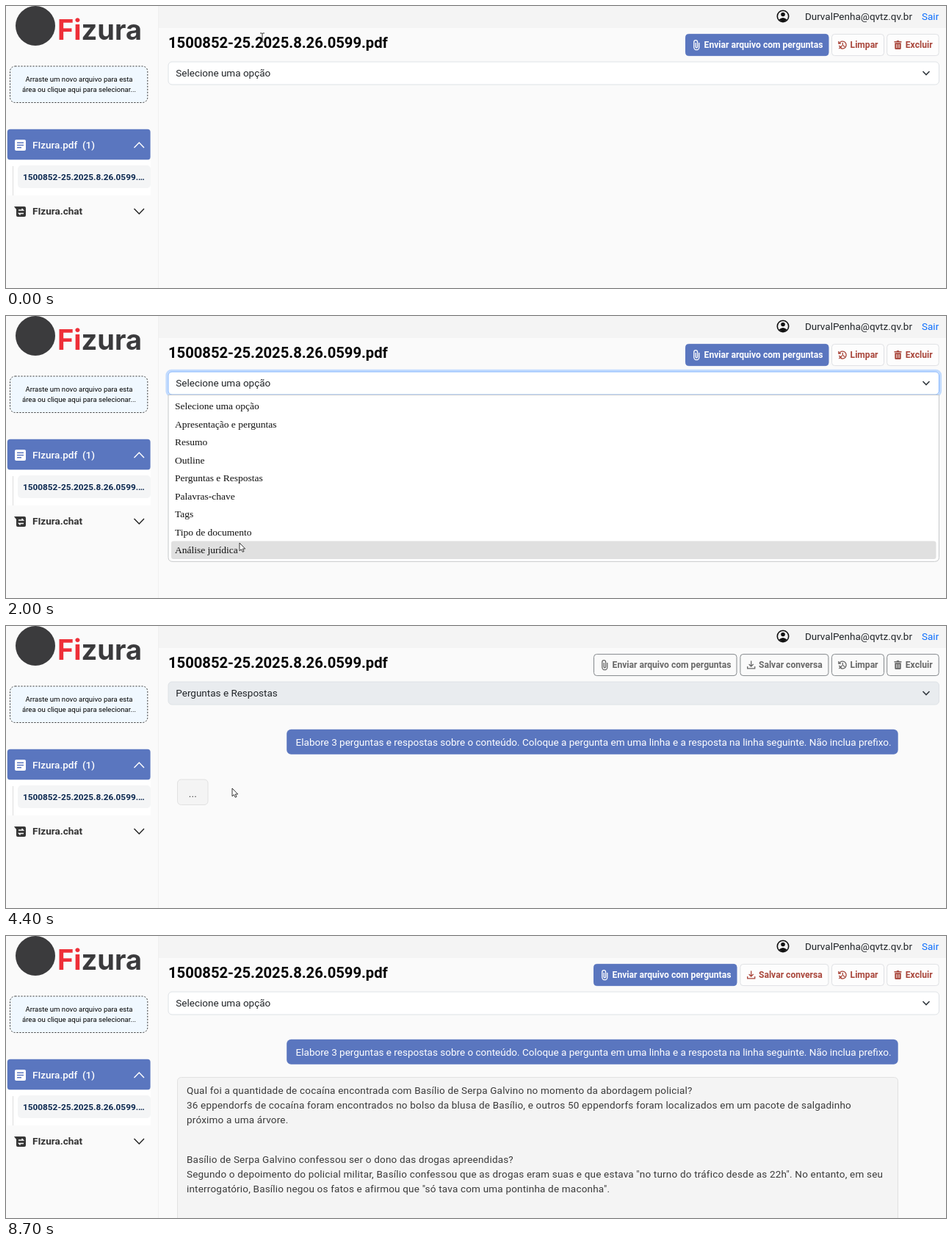
An HTML page for the animation above (8900 ms loop, 1280 by 384 pixels).

```html
<!DOCTYPE html>
<html lang="pt-BR">
<head>
<meta charset="utf-8">
<title>Perguntas e respostas</title>
<style>
  html, body { margin: 0; width: 100%; height: 100%; overflow: hidden; background: #fafafa; }
  svg { display: block; width: 100vw; height: 100vh; }
  text { font: 13.5px Roboto, sans-serif; fill: #212529; white-space: pre; }
  .bold { font-weight: 700; }
  .title { font-size: 20.2px; fill: #000; }
  .brand { font: 700 38px Inter, sans-serif; fill: #3b3b3d; }
  .drop { font-size: 9.6px; fill: #000; text-anchor: middle; }
  .option { font-family: "Liberation Serif", serif; fill: #111; }
  .answer { fill: #3a3a3a; letter-spacing: .19px; }
  .white { fill: #fff; }
  .medium { font-weight: 500; }
  .line { fill: none; stroke: currentColor; stroke-width: 1.3; }
  .label { font-size: 12.1px; font-weight: 700; fill: currentColor; }
  .primary { color: #fff; --fill: #5a76bf; --edge: #5a76bf; }
  .danger { color: #a9463b; --fill: #fdfdfd; --edge: #dfe1e4; }
  .busy { color: #686868; --fill: #fafafa; --edge: #85898d; }
  .box { fill: var(--fill); stroke: var(--edge); }
</style>
</head>
<body>
<svg viewBox="0 0 1280 384" preserveAspectRatio="none">
  <defs>
    <g id="clip"><path class="line" d="M3.5-3V3.2a3.5 3.5 0 0 1-7 0V-4a2.4 2.4 0 0 1 4.8 0V2.6a1.2 1.2 0 0 1-2.4 0V-3"/></g>
    <g id="save"><path class="line" d="M0-5.5V2M-3-1 0 2 3-1M-5 2V4.8H5V2"/></g>
    <g id="history"><path class="line" d="M-4.5-2.5A5 5 0 1 1-3 4.2M-5.5-5V-2H-2.5M0-3V.5L3 2.5M-5 1 -1 5M-1 1-5 5"/></g>
    <g id="trash">
      <path fill="currentColor" d="M-5-5H-2L-1.3-6H1.3L2-5H5V-3.6H-5ZM-4.2-2.8H4.2V4.5Q4.2 6 2.8 6H-2.8Q-4.2 6-4.2 4.5Z"/>
      <path d="M-1.5-1V4.2M1.5-1V4.2" stroke="var(--fill)" stroke-width="1"/>
    </g>
  </defs>

  <rect width="1280" height="384" fill="#fafafa"/>
  <rect x="207" width="1073" height="30" fill="#f4f4f4"/>
  <path d="M207.5 0V384" stroke="#f0f0f0"/>

  <circle cx="40" cy="27" r="27" fill="#3b3b3d"/>
  <text class="brand" x="70" y="46"><tspan fill="#ee2f38">Fi</tspan>zura</text>

  <rect x="5.5" y="82" width="187.3" height="49.5" rx="7" fill="#f0f8ff" stroke="#333" stroke-dasharray="2 2"/>
  <text class="drop" x="99.5" y="103.3">Arraste um novo arquivo para esta</text>
  <text class="drop" x="99.5" y="117.3">área ou clique aqui para selecionar...</text>

  <rect x="1.8" y="167.8" width="194.8" height="41.8" rx="4" fill="#5a76bf"/>
  <rect x="12" y="182" width="15" height="15" rx="2" fill="#fff"/>
  <path d="M15 186.2H24M15 189.5H24M15 192.8H21" stroke="#5a76bf" stroke-width="1.5"/>
  <text class="white medium" x="36" y="194">FIzura.pdf  (1)</text>
  <path d="M174.5 193 181.3 186 188 193" fill="none" stroke="#fff" stroke-width="1.4"/>
  <rect x="2" y="209.6" width="195" height="48.4" fill="#fff"/>
  <path d="M9.5 218V258" stroke="#dcdcdc"/>
  <rect x="16" y="217" width="181" height="31" rx="5" fill="#f4f5f6"/>
  <text class="bold" style="font-size:11.8px;fill:#0b2850" x="23" y="237">1500852-25.2025.8.26.0599.…</text>

  <path d="M11 273H25Q27 273 27 275V285Q27 287 25 287H16Q14 287 14 285V277Z" fill="#363636"/>
  <path d="M17 278H23.5L21.5 276M24 282.5H17.5L19.5 284.5" fill="none" stroke="#fff" stroke-width="1.3"/>
  <text class="bold" style="fill:#333" x="36" y="284.3">FIzura.chat</text>
  <path d="M174.5 276 181.3 283 188 276" fill="none" stroke="#222" stroke-width="1.4"/>

  <circle cx="1058" cy="14" r="7.7" fill="none" stroke="#111" stroke-width="1.6"/>
  <circle cx="1058" cy="11.5" r="2.8" fill="#111"/>
  <path d="M1052.5 18.5Q1058 13.5 1063.5 18.5 1058 24 1052.5 18.5Z" fill="#111"/>
  <text x="1234" y="19" text-anchor="end">DurvalPenha@qvtz.qv.br</text>
  <text x="1247" y="19" style="fill:#0d6efd">Sair</text>

  <text class="title bold" x="221" y="56.5">1500852-25.2025.8.26.0599.pdf</text>
  <g id="buttons"></g>

  <rect id="ring" x="219" y="74.3" width="1053.5" height="34.4" rx="6.5" fill="none" stroke="#c2dbfe" stroke-width="3.2"/>
  <rect id="select" x="221" y="76" width="1049.5" height="31" rx="5"/>
  <text id="choice" x="231.3" y="96.3"></text>
  <path d="M1248.5 89 1253 93.6 1257.5 89" fill="none" stroke="#343a40" stroke-width="1.6"/>

  <g id="menu">
    <path d="M221 107.5H1270.5V328.5Q1270.5 334.3 1264.5 334.3H227Q221 334.3 221 328.5Z" fill="#fff" stroke="#c6c8ca"/>
    <rect id="hover" x="225" width="1041.5" height="24.5" rx="3" fill="#e0e0e0"/>
  </g>

  <g id="chat">
    <rect x="382.2" y="140.8" width="832.5" height="34" rx="6" fill="#5a76bf"/>
    <text class="white" x="394.6" y="163.3">Elabore 3 perguntas e respostas sobre o conteúdo. Coloque a pergunta em uma linha e a resposta na linha seguinte. Não inclua prefixo.</text>
    <rect id="bubble" x="233.5" rx="5" fill="#f4f4f4" stroke="#e1e1e1"/>
    <text id="dots" class="answer" x="248.8" y="232.5">...</text>
    <g id="reply"></g>
  </g>

  <g id="cursor">
    <path id="arrow" d="M0 0V10.8L2.5 8.6 4.2 12.3 6 11.5 4.3 8H7.7Z" fill="#fff" stroke="#222" stroke-width=".9"/>
    <path id="beam" d="M-3-6H-1Q0-6 0-5V5Q0 6-1 6H-3M3-6H1Q0-6 0-5M0 5Q0 6 1 6H3" fill="none" stroke="#333"/>
  </g>
</svg>
<script>
const LOOP = 8900;
const $ = id => document.getElementById(id);
const show = (node, on) => { node.style.display = on ? '' : 'none'; };

function add(parent, tag, attrs, content = '') {
  const node = document.createElementNS('http://www.w3.org/2000/svg', tag);
  for (const key in attrs) node.setAttribute(key, attrs[key]);
  node.textContent = content;
  return parent.appendChild(node);
}

function button(parent, kind, x, width, icon, label) {
  const g = add(parent, 'g', { class: kind });
  add(g, 'rect', { class: 'box', x: x + .2, y: 38.4, width: width - .5, height: 29.2, rx: 4 });
  add(g, 'use', { href: '#' + icon, x: x + 15, y: 53 });
  add(g, 'text', { class: 'label', x: x + 25.3, y: 57.4 }, label);
}

function toolbar(main, side, withSave) {
  const g = add($('buttons'), 'g', {});
  button(g, main, withSave ? 800.3 : 925.3, 195, 'clip', 'Enviar arquivo com perguntas');
  if (withSave) button(g, side, 999.7, 120.5, 'save', 'Salvar conversa');
  button(g, side, 1124.3, 71.5, 'history', 'Limpar');
  button(g, side, 1199.5, 71, 'trash', 'Excluir');
  return g;
}

const idleBar = toolbar('primary', 'danger', false);
const busyBar = toolbar('busy', 'busy', true);
const doneBar = toolbar('primary', 'danger', true);

const options = ['Selecione uma opção', 'Apresentação e perguntas', 'Resumo', 'Outline',
  'Perguntas e Respostas', 'Palavras-chave', 'Tags', 'Tipo de documento', 'Análise jurídica'];
const ROW = 24.5, MENU_TOP = 110.7;
options.forEach((name, i) =>
  add($('menu'), 'text', { class: 'option', x: 230, y: MENU_TOP + 16.7 + i * ROW }, name));

// Each line of the reply: arrival time, baseline, text, then a late ending
const lines = [
  [7100, 214.6, 'Qual foi a quantidade de cocaína encontrada com Basílio de Serpa Galvino no momento da abordagem policial?'],
  [7500, 234.8, '36 eppendorfs de cocaína foram encontrados no bolso da blusa de Basílio, e outros 50 eppendorfs foram localizados em um pacote de salgadinho'],
  [7500, 255, 'próximo a uma árvore', 7800, '.'],
  [7800, 308.8, 'Basílio de Serpa Galvino confessou ser o dono das drogas apreendidas?'],
  [8200, 329, 'Segundo o depoimento do policial militar, Basílio confessou que as drogas eram suas e que estava "no turno do tráfico desde as 22h". No entanto, em seu'],
  [8200, 349.2, 'interrogatório, Basílio negou os fatos e afirmou que "só tava com uma pontinha de maconha', 8500, '".']
].map(([at, y, text, tailAt, tail = '']) =>
  ({ at, y, text, tailAt, tail, node: add($('reply'), 'text', { class: 'answer', x: 246, y }) }));

// Pointer path: time, x, y
const path = [
  [0, 349, 43], [100, 374, 72], [200, 394, 97], [1000, 394, 97], [1100, 388, 130],
  [1200, 364, 216], [1300, 348, 248], [1700, 321, 311], [1900, 321, 311], [2000, 318, 309],
  [2800, 301, 212], [2900, 300, 208], [3300, 300, 208], [3400, 300, 214], [3500, 300, 221],
  [4300, 300, 221], [4400, 308, 221], [4600, 370, 188], [4800, 470, 158], [4900, 470, 158],
  [5000, 450, 158], [5800, 767, 168], [6300, 1015, 168], [6800, 1015, 168],
  [7200, 600, 85], [7600, 97, 358]
];

function pointer(t) {
  const i = path.findIndex(p => p[0] > t);
  if (i < 0) return path[path.length - 1].slice(1);
  const [t0, x0, y0] = path[i - 1], [t1, x1, y1] = path[i];
  const k = (t - t0) / (t1 - t0);
  return [x0 + (x1 - x0) * k, y0 + (y1 - y0) * k];
}

function drawBubble(t) {
  const waiting = t < lines[0].at;
  let bottom = 243.5;
  for (const line of lines) {
    line.node.textContent = t < line.at ? '' : line.text + (t >= line.tailAt ? line.tail : '');
    if (t >= line.at) bottom = line.y + 64;
  }
  const top = waiting ? 209 : 192.5;
  const width = waiting ? 41.5 : t < 7500 ? 720 : 981;
  $('bubble').setAttribute('y', top);
  $('bubble').setAttribute('width', width);
  $('bubble').setAttribute('height', bottom - top);
  show($('dots'), waiting);
}

function render(now) {
  const t = Math.floor(now % LOOP / 100) * 100;
  const busy = t >= 3900 && t < 8700;
  const focused = t >= 500 && t < 3900;

  show(idleBar, t < 3900);
  show(busyBar, busy);
  show(doneBar, t >= 8700);

  $('ring').style.opacity = focused ? Math.min(1, (t - 400) / 300) : 0;
  $('select').setAttribute('fill', busy ? '#e9ecef' : '#fff');
  $('select').setAttribute('stroke', focused ? '#86b7fe' : '#dee2e6');
  $('choice').textContent = options[t >= 3800 && t < 8700 ? 4 : 0];

  // The highlighted row trails the pointer by one step
  show($('menu'), t >= 500 && t < 3800);
  const row = Math.floor((pointer(Math.max(0, t - 100))[1] - MENU_TOP) / ROW);
  $('hover').setAttribute('y', MENU_TOP - .2 + Math.min(8, Math.max(0, row)) * ROW);

  show($('chat'), t >= 3900);
  drawBubble(t);

  const [x, y] = pointer(t);
  const overText = t < 100 || (t > 4400 && t < 6900 && y < 167);
  show($('cursor'), t < 7700);
  show($('beam'), overText);
  show($('arrow'), !overText);
  $('cursor').setAttribute('transform', `translate(${x} ${y})`);
}

const start = performance.now();
function tick() {
  render(performance.now() - start);
  requestAnimationFrame(tick);
}
tick();
</script>
</body>
</html>
```
